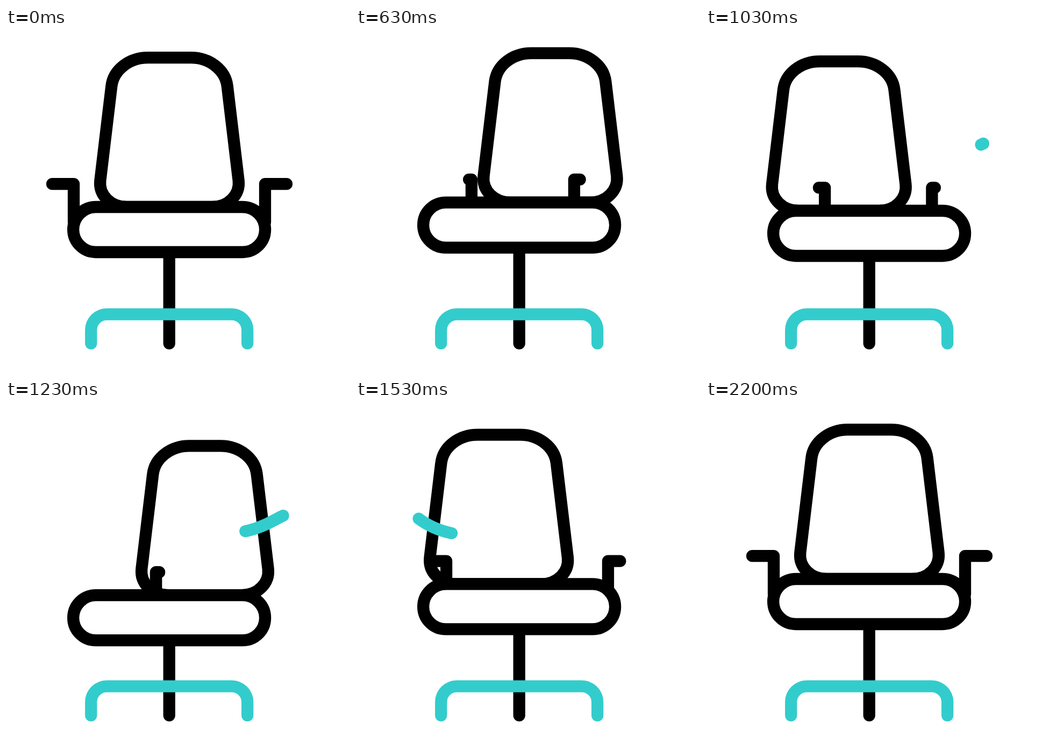
These frames come from a looping animation (640 px wide and 640 px high, 2500 ms). An HTML page with a canvas:

```html
<!DOCTYPE html>
<html lang="en">
<head>
<meta charset="utf-8">
<title>Spinning office chair</title>
<style>
  html, body { margin: 0; width: 100%; height: 100%; overflow: hidden; background: #fff; }
  canvas { display: block; width: 100vw; height: 100vh; }
</style>
</head>
<body>
<canvas id="stage" width="640" height="640"></canvas>
<script>
const ctx = document.getElementById('stage').getContext('2d');
const LOOP = 2500, START = 470;
const BLACK = '#000', TEAL = '#33cccc', MID = 304;

// Swoosh around the chair: across the front from the right, then behind
const ORBIT = [
  [516, 215], [446, 244], [310, 259], [179, 248], [117, 221],
  [121, 206], [159, 195], [255, 178], [355, 174], [459, 184]
];
const END = ORBIT.length - 1;
const TURN = 4.5; // where the swoosh passes behind

const clamp = (v, lo, hi) => Math.min(hi, Math.max(lo, v));

function ease(t, from, to) {
  const p = clamp((t - from) / (to - from), 0, 1);
  return p * p * (3 - 2 * p);
}

// Catmull-Rom point at position u along the orbit
function orbitPoint(u) {
  const i = Math.min(END - 1, Math.floor(u)), s = u - i;
  const [a, b, c, d] = [-1, 0, 1, 2].map(k => ORBIT[clamp(i + k, 0, END)]);
  return [0, 1].map(k => b[k] + s / 2 * (c[k] - a[k]
    + s * (2 * a[k] - 5 * b[k] + 4 * c[k] - d[k] + s * (3 * (b[k] - c[k]) + d[k] - a[k]))));
}

function stroke(color, build, fill) {
  ctx.beginPath();
  build();
  if (fill) {
    ctx.fillStyle = '#fff';
    ctx.fill();
  }
  ctx.strokeStyle = color;
  ctx.stroke();
}

function drawLine(points, color = BLACK) {
  stroke(color, () => points.forEach(([x, y]) => ctx.lineTo(x, y)));
}

function drawSwoosh(from, to) {
  if (to - from < 0.001) return;
  const steps = 80;
  const points = Array.from({ length: steps + 1 },
    (_, i) => orbitPoint(from + (to - from) * i / steps));
  drawLine(points, TEAL);
}

function drawBack(shift, inset, dy) {
  const l = shift + inset, r = 2 * MID + shift - inset;
  stroke(BLACK, () => {
    ctx.moveTo(264 + l, 55.2 + dy);
    ctx.bezierCurveTo(229 + l, 55.2 + dy, 200 + l, 78 + dy, 196.3 + l, 108 + dy);
    ctx.lineTo(175.3 + l, 284 + dy);
    ctx.bezierCurveTo(172.5 + l, 310 + dy, 194 + l, 333 + dy, 225 + l, 333 + dy);
    ctx.lineTo(r - 225, 333 + dy);
    ctx.bezierCurveTo(r - 194, 333 + dy, r - 172.5, 310 + dy, r - 175.3, 284 + dy);
    ctx.lineTo(r - 196.3, 108 + dy);
    ctx.bezierCurveTo(r - 200, 78 + dy, r - 229, 55.2 + dy, r - 264, 55.2 + dy);
    ctx.closePath();
  }, true);
}

function drawArms(sin, lean, dy) {
  const turn = Math.abs(sin);
  const half = 178 * (1 - 0.25 * turn - 0.75 * turn ** 8);
  const reach = 40 * (1 - turn ** 1.55);
  const y = 290.2 + dy;
  for (const side of [-1, 1]) {
    const x = MID + lean + side * half;
    const tip = x + side * reach + 6 * sin ** 5;
    drawLine([[tip, y], [x, y], [x, y + 71]]);
  }
}

function drawSeat(dy) {
  stroke(BLACK, () => ctx.roundRect(125.1, 333 + dy, 357, 84, 42), true);
}

function drawBase() {
  stroke(TEAL, () => {
    ctx.moveTo(158.2, 586.8);
    ctx.arcTo(158.2, 532.6, 188, 532.6, 29.4);
    ctx.arcTo(449.2, 532.6, 449.2, 562, 29.4);
    ctx.lineTo(449.2, 586.8);
  });
}

function draw(t) {
  if (t < START) t = 0;

  // Two overlapping turns, with a hop, a drop and a recovery
  const first = ease(t, 415, 1245), second = ease(t, 1025, 1653);
  const angle = 2 * Math.PI * (first + second);
  const sin = Math.sin(angle), cos = Math.cos(angle);
  const dy = -16.6 * ease(t, 430, 830) + 46.8 * ease(t, 830, 1230) - 30.2 * ease(t, 1230, 1710);
  const lean = (13 - 38 * first) * sin + 1.3 * Math.sin(Math.PI * first);

  const head = Math.min(END, (Math.max(0, t - 930) / 300) ** 2);
  const tail = clamp((t - 1230) / 100, 0, END);

  const back = () => drawBack(66 * sin, 11 * sin ** 6, dy);
  const arms = () => drawArms(sin, lean, dy);

  ctx.fillStyle = '#fff';
  ctx.fillRect(0, 0, 640, 640);
  ctx.lineWidth = 22.3;
  ctx.lineCap = ctx.lineJoin = 'round';

  drawSwoosh(Math.max(tail, TURN), head);
  // The backrest covers the arms while the chair faces away
  const parts = cos < -0.1 ? [arms, back] : [back, arms];
  parts.forEach(part => part());
  drawLine([[303.7, 415], [303.7, 586.8]]);
  drawSeat(dy);
  drawSwoosh(tail, Math.min(head, TURN));
  drawBase();
}

const begin = performance.now();
function tick() {
  draw((performance.now() - begin) % LOOP);
  requestAnimationFrame(tick);
}
tick();
</script>
</body>
</html>
```
